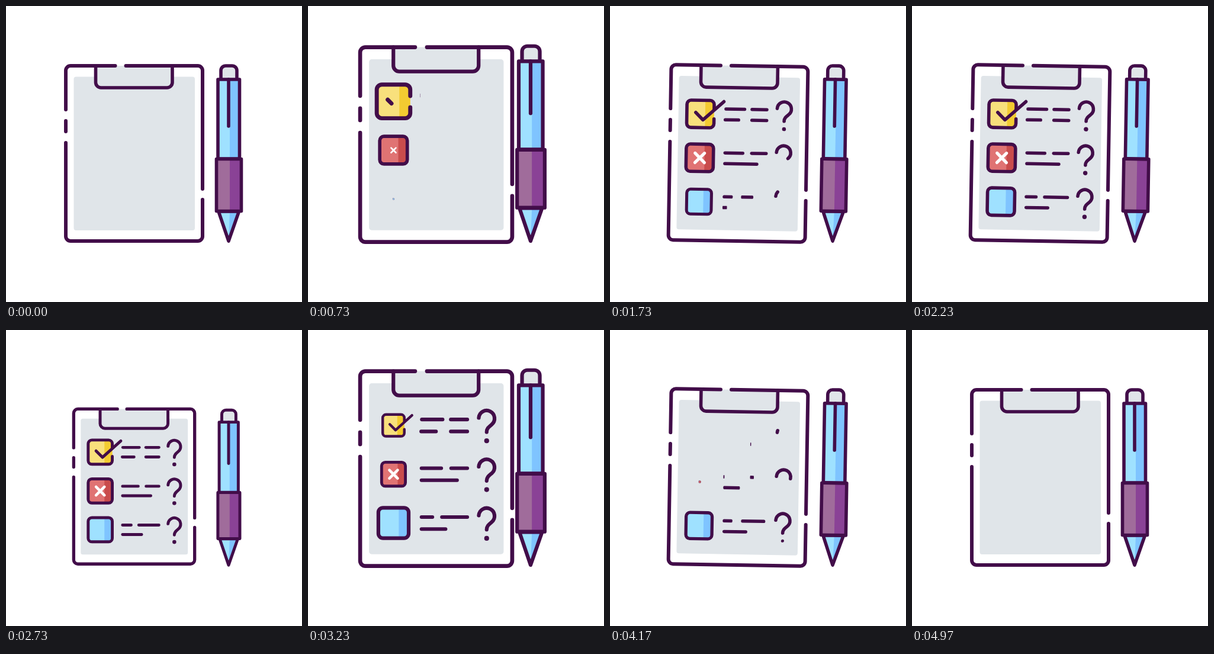
Animation of 500x500 px, one loop 5030 ms. Source, as an HTML page:

```html
<!DOCTYPE html>
<html lang="en">
<head>
<meta charset="utf-8">
<title>Checklist</title>
<style>
  html, body { margin: 0; width: 100%; height: 100%; overflow: hidden; background: #fff; }
  svg { display: block; width: 100%; height: 100%; }
  .ink { fill: none; stroke: #420d49; stroke-width: 5.6; stroke-linecap: round; stroke-linejoin: round; }
  .board-edge { stroke-width: 6; }
  .dark { fill: #420d49; }
  .paper { fill: #e0e5e9; }
  .sky { fill: #9fe1ff; }
  .blue { fill: #7fc4ff; }
  .cross { fill: none; stroke: #fff; stroke-width: 5.2; stroke-linecap: round; }
</style>
</head>
<body>
<svg viewBox="0 0 500 500">
  <g id="board">
    <rect class="paper" x="114.5" y="119.5" width="204.5" height="259.5" rx="4"/>
    <path class="paper" d="M151.5 101V129a9 9 0 0 0 9 9H272a9 9 0 0 0 9-9V101Z"/>
    <path class="ink" d="M151.5 101V129a9 9 0 0 0 9 9H272a9 9 0 0 0 9-9V101"/>
    <path class="ink board-edge" d="M202.5 101H324a8 8 0 0 1 8 8V309M332 327V389a8 8 0 0 1-8 8H109a8 8 0 0 1-8-8V231M101 212V194M101 175V109a8 8 0 0 1 8-8H184.5"/>
    <g id="rows"></g>
  </g>
  <g id="pen">
    <path class="paper" d="M363 123V109a8 8 0 0 1 8-8h11a8 8 0 0 1 8 8v14Z"/>
    <path class="ink" d="M363 123V109a8 8 0 0 1 8-8h11a8 8 0 0 1 8 8v14"/>
    <rect class="sky" x="358" y="124" width="36.5" height="134"/>
    <rect class="blue" x="378" y="124" width="16.5" height="134"/>
    <rect class="ink" x="358" y="124" width="36.5" height="134"/>
    <path class="ink" d="M376 124V203"/>
    <path class="sky" d="M359 347H393.5L376 397Z"/>
    <path class="blue" d="M378 347H393.5L376 397Z"/>
    <path class="ink" d="M359 347H393.5L376 397Z"/>
    <rect x="355.5" y="258.5" width="42" height="88" fill="#a06c9b"/>
    <rect x="378" y="258.5" width="19.5" height="88" fill="#8a4296"/>
    <rect class="ink" x="355.5" y="258.5" width="42" height="88"/>
  </g>
</svg>
<script>
const LOOP = 5030, STEP = 100 / 3, CYCLE = 75, PITCH = 74.1;
const $ = id => document.getElementById(id);
const clamp = v => Math.max(0, Math.min(1, v));

// cubic-bezier(.42, 0, .58, 1)
function ease(x) {
  if (x <= 0) return 0;
  if (x >= 1) return 1;
  let lo = 0, hi = 1, s;
  for (let i = 0; i < 22; i++) {
    s = (lo + hi) / 2;
    const bx = 1.26 * s * (1 - s) ** 2 + 1.74 * s * s * (1 - s) + s ** 3;
    if (bx < x) lo = s; else hi = s;
  }
  return s * s * (3 - 2 * s);
}

function track(keys, f) {
  if (f <= keys[0][0]) return keys[0][1];
  for (let i = 1; i < keys.length; i++) {
    const [a, u] = keys[i - 1], [b, v] = keys[i];
    if (f < b) return u + (v - u) * ease((f - a) / (b - a));
  }
  return keys[keys.length - 1][1];
}

const PULSE = [[0, 1], [12, .82], [27, 1.2], [38, 1]];
const POP = [[0, 0], [9, 1.12], [27, .7], [34, 1]];

// Parts enter and leave along the same curve, mirrored in time.
const phase = (f, start, end) => Math.min(f - start, end - f);

function add(parent, tag, attrs) {
  const el = document.createElementNS("http://www.w3.org/2000/svg", tag);
  for (const k in attrs) el.setAttribute(k, attrs[k]);
  parent.append(el);
  return el;
}

function scaleAt(el, x, y, sx, sy = sx) {
  el.style.display = sx > 0.001 ? "" : "none";
  el.setAttribute("transform", `translate(${x} ${y}) scale(${sx} ${sy})`);
}

function trim(el, p) {
  el.style.display = p > 0.001 ? "" : "none";
  el.setAttribute("stroke-dashoffset", 1 - p);
}

const trimmed = (parent, d) =>
  add(parent, "path", { class: "ink", d, pathLength: 1, "stroke-dasharray": "1 2" });

const CLOSED = "M-16-23.2H16a7 7 0 0 1 7 7V16a7 7 0 0 1-7 7H-16a7 7 0 0 1-7-7V-16.2a7 7 0 0 1 7-7Z";
const OPEN = "M23-7.5V-16.2a7 7 0 0 0-7-7H-16a7 7 0 0 0-7 7V16a7 7 0 0 0 7 7H16a7 7 0 0 0 7-7V8";

// dashes: left, right, line (0 upper, 1 lower)
const ROWS = [
  { light: "#f8e07c", shade: "#f3cb31",
    dashes: [[192, 229, 0], [236, 266.5, 0], [191, 219, 1], [236, 266.5, 1]] },
  { light: "#e07373", shade: "#c94c4c",
    dashes: [[191.5, 227, 0], [236.5, 266.5, 0], [191.5, 251, 1]] },
  { light: "#9fe1ff", shade: "#7fc4ff",
    dashes: [[191.5, 213.5, 0], [222.5, 266.5, 0], [191.5, 233.5, 1]] }
];

const rows = ROWS.map((row, i) => {
  const g = add($("rows"), "g", { transform: `translate(0 ${183.5 + i * PITCH})` });
  const box = add(g, "g", {});
  add(box, "path", { d: CLOSED, fill: row.light });
  add(box, "path", { d: "M8-23.2H16a7 7 0 0 1 7 7V16a7 7 0 0 1-7 7H8Z", fill: row.shade });
  add(box, "path", { class: "ink", d: i ? CLOSED : OPEN });
  const check = i === 0 && trimmed(box, "M-8-2.5L4.3 9.8L39.3-21.5");
  const cross = i === 1 && add(box, "path", { class: "cross", d: "M-8-8L8 8M8-8L-8 8" });
  const dashes = row.dashes.map(([x, end, line]) => ({
    x, y: line ? 9.1 : -9.1,
    el: add(g, "rect", { class: "dark", y: -2.75, width: end - x, height: 5.5, rx: 2.75 })
  }));
  const hook = trimmed(g, "M281.2-11.5A12 12 0 1 1 300.9-1.5C296.5 2.2 293.2 4.5 293.2 10");
  const dot = add(g, "circle", { class: "dark", r: 3.7 });
  return { box, check, cross, dashes, hook, dot };
});

function drawRow(r, i, f) {
  const pb = phase(f, 10.7 + 5 * i, 121.6 + 5 * i);
  scaleAt(r.box, 151.7, 0, track(POP, pb));
  if (r.check) trim(r.check, ease((pb - 8) / 14));
  if (r.cross) scaleAt(r.cross, 0, 0, ease((pb - 1.3) / 10));

  r.dashes.forEach((d, k) => {
    const p = phase(f, 21.3 + 11.8 * i + 2 * k, 121.5 + 5.2 * i + 1.7 * k);
    scaleAt(d.el, d.x, d.y, ease(p / 10.5), 1);
  });

  const pq = phase(f, 39 + 5 * i, 127 + 5 * i);
  trim(r.hook, ease(pq / 12));
  scaleAt(r.dot, 293.2, 23.3, ease((pq - 7.7) / 7));
}

function draw(t) {
  const f = Math.floor((t % LOOP + 4) / STEP);
  const c = f < 2 * CYCLE ? f % CYCLE : 0;
  const s = track(PULSE, c);
  const shaking = c > 39.75 && c < 74;
  const turn = shaking ? 3.1 * clamp((74 - c) / 5) * Math.cos((c - 51) * 2 * Math.PI / 5) : 0;
  const zoom = (x, y) => `translate(${x} ${y}) scale(${s}) translate(${-x} ${-y})`;
  $("board").setAttribute("transform", `rotate(${turn} 216.5 249) ${zoom(216.5, 382)}`);
  $("pen").setAttribute("transform", `rotate(${turn} 376 398) ${zoom(376, 398)}`);
  rows.forEach((r, i) => drawRow(r, i, f));
}

const begin = performance.now();
function tick() {
  draw(performance.now() - begin);
  requestAnimationFrame(tick);
}
tick();
</script>
</body>
</html>
```
